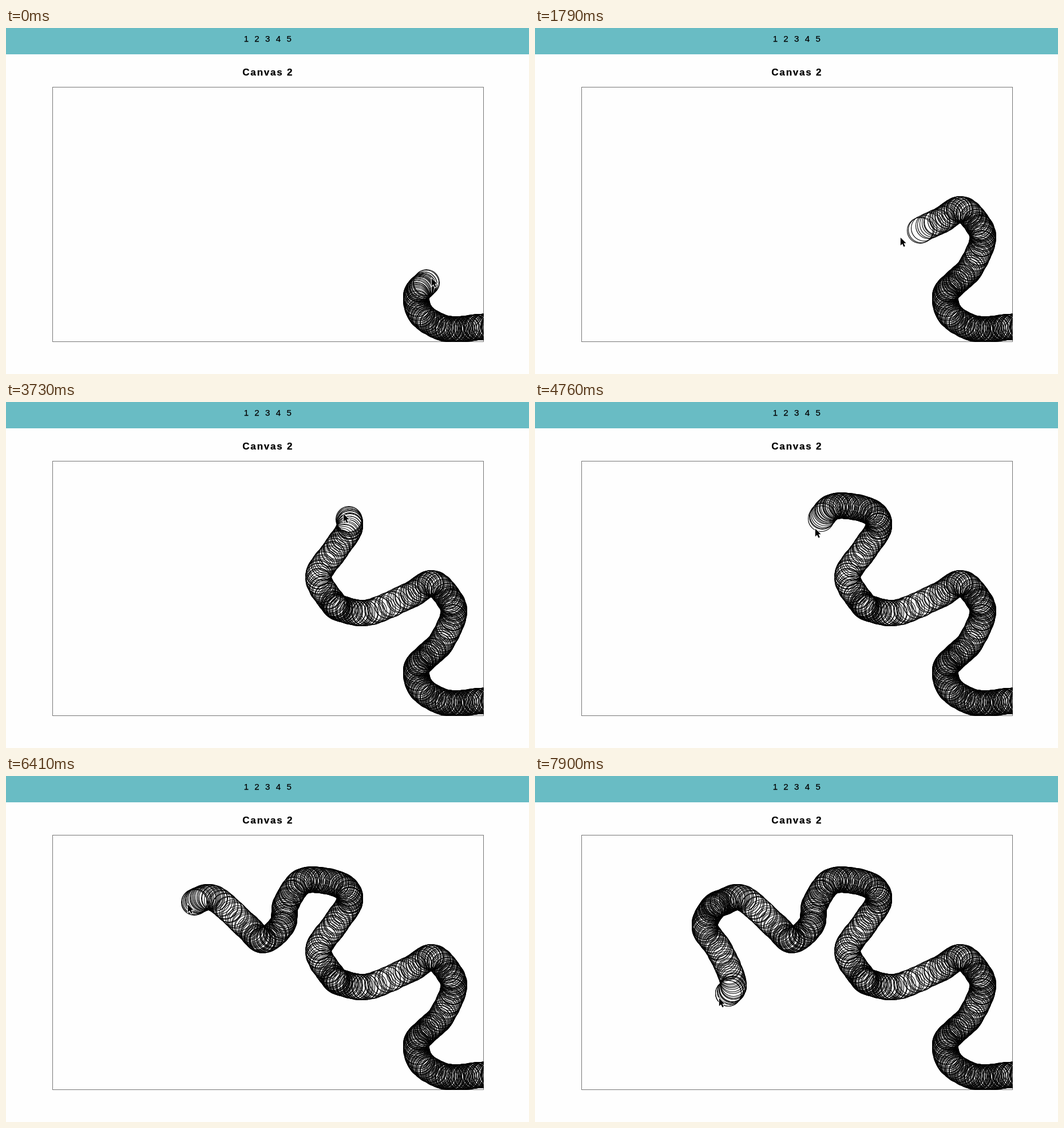
An HTML page with a canvas that plays this animation: 914x605 px, repeating every 8 s.

```html
<!DOCTYPE html>
<html lang="en">
<head>
<meta charset="utf-8">
<title>Canvas 2</title>
<style>
  html, body { margin: 0; width: 100%; height: 100%; overflow: hidden; background: #fefefe; }
  svg, canvas { position: absolute; left: 0; top: 0; display: block; }
  text { font-family: "Liberation Sans", Arial, sans-serif; fill: #000; stroke: #000; stroke-width: .25; }
</style>
</head>
<body>
<svg width="914" height="605" viewBox="0 0 914 605">
  <rect width="914" height="46" fill="#69bcc4"/>
  <text x="419.8 438.4 457.1 475.8 494.6" y="24" font-size="15" text-anchor="middle">12345</text>
  <text x="413.3" y="82.6" font-size="17" font-weight="700" letter-spacing="1.8">Canvas 2</text>
  <rect x="81.5" y="103.5" width="753" height="445" fill="none" stroke="#777"/>
</svg>
<canvas id="stage" width="914" height="605"></canvas>
<script>
const ctx = document.getElementById('stage').getContext('2d');
const LOOP = 8000, STEP = 149, PER_STEP = 9, RADIUS = 22.5;
const LEAD = 0.8;               // the pointer runs ahead of the ink
const PAUSES = [5, 16, 26, 44]; // steps during which the pointer rests

// Key points of the hand's path, KEY_GAP steps apart; the first TAIL steps are already inked.
const TAIL = 12, KEY_GAP = 2;
const path = [
  [858, 522], [826, 523], [790, 527], [760, 523], [726, 501], [717, 467],
  [735, 445], [760, 421], [782, 373], [775, 345], [745, 317], [706, 338],
  [634, 368], [588, 362], [570, 349], [546, 305], [576, 258], [601, 218],
  [588, 193], [548, 182], [514, 187], [489, 225], [483, 260], [450, 287],
  [420, 262], [364, 214], [328, 221], [309, 233], [297, 266], [324, 307],
  [347, 366], [321, 389]
];

const arrow = new Path2D('M.8 1.6V15.2L4 12.2 6.4 17.6 8.8 16.5 6.4 11.3H10.6Z');

const key = i => path[Math.max(0, Math.min(path.length - 1, i))];

// Catmull-Rom position, rounded to whole pixels like mouse coordinates.
function at(step) {
  const s = (step + TAIL) / KEY_GAP, i = Math.floor(s), u = s - i;
  const [a, b, c, d] = [-1, 0, 1, 2].map(n => key(i + n));
  return [0, 1].map(n => Math.round(b[n] + u / 2 * (c[n] - a[n]
    + u * (2 * a[n] - 5 * b[n] + 4 * c[n] - d[n]
    + u * (3 * (b[n] - c[n]) + d[n] - a[n])))));
}

function random(seed) {
  const v = Math.sin(seed * 12.9898) * 43758.5453;
  return v - Math.floor(v);
}

function drawTrail(step) {
  ctx.save();
  ctx.beginPath();
  ctx.rect(82, 104, 752.5, 444.5);
  ctx.clip();
  ctx.strokeStyle = '#000';
  ctx.lineWidth = 1.1;
  for (let i = -TAIL * PER_STEP; i <= step * PER_STEP; i++) {
    const [x, y] = at((i - 1.2 * random(i)) / PER_STEP);
    ctx.beginPath();
    ctx.arc(x, y, RADIUS, 0, Math.PI * 2);
    ctx.stroke();
  }
  ctx.restore();
}

function drawPointer(step) {
  const [x, y] = at(step + LEAD);
  ctx.save();
  ctx.translate(x - 2, y - 1);
  ctx.strokeStyle = '#fff';
  ctx.lineWidth = 2;
  ctx.stroke(arrow);
  ctx.fillStyle = '#000';
  ctx.fill(arrow);
  ctx.restore();
}

let shown = -1;
function tick() {
  const raw = Math.floor((performance.now() % LOOP + 8) / STEP);
  const step = raw - PAUSES.filter(p => p <= raw).length;
  if (step !== shown) {
    shown = step;
    ctx.clearRect(0, 0, 914, 605);
    drawTrail(step);
    drawPointer(step);
  }
  requestAnimationFrame(tick);
}
tick();
</script>
</body>
</html>
```
